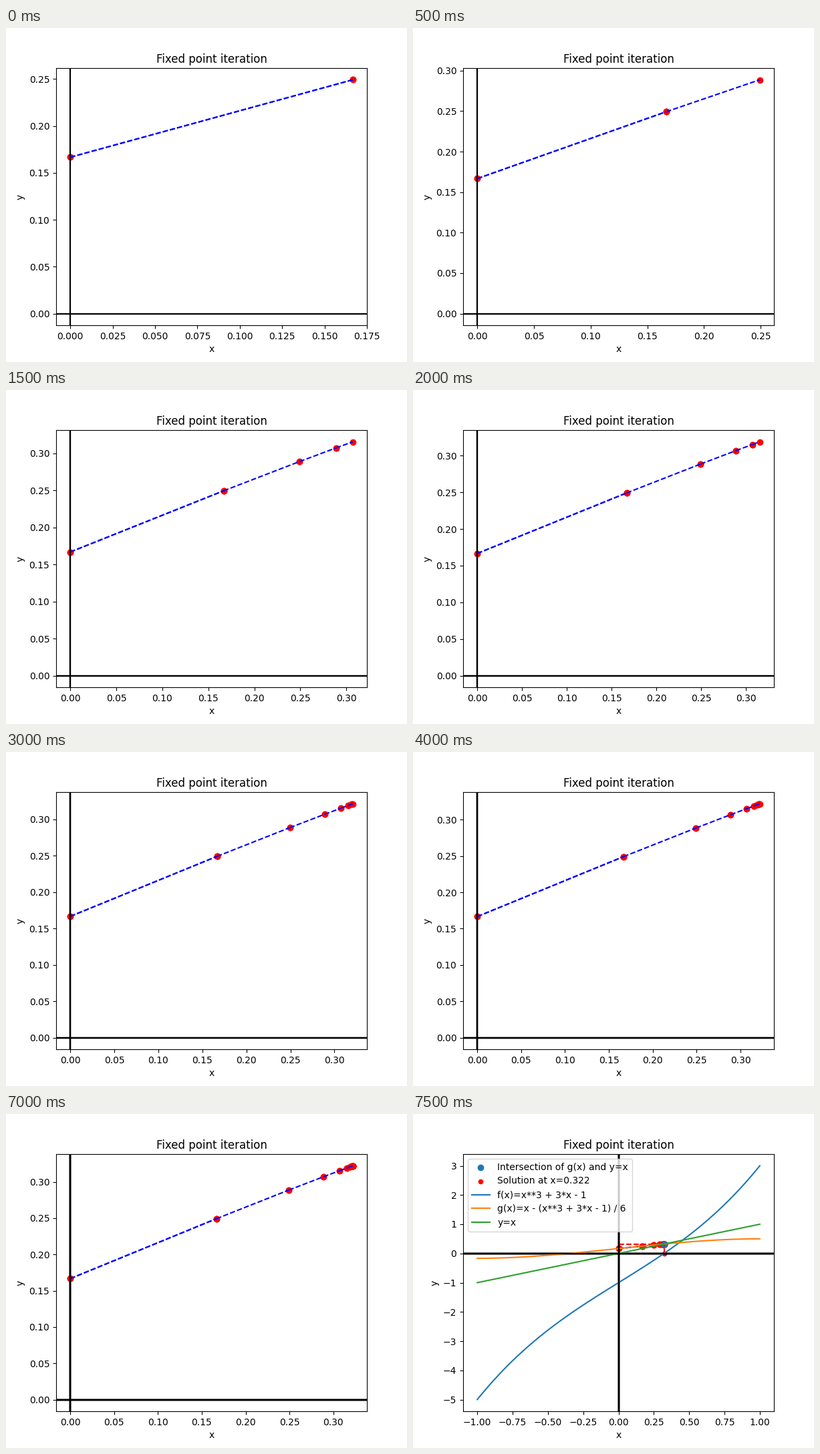
These frames come from a looping animation (600x500 px, 8 s). A matplotlib script:

```python
import numpy as np
import matplotlib.pyplot as plt
from matplotlib.animation import FuncAnimation

FRAMES = 16
INTERVAL = 500


def f(x):
    return x**3 + 3*x - 1


def g(x):
    return x - f(x) / 6


iterates = [0.0]
for _ in range(FRAMES + 1):
    iterates.append(g(iterates[-1]))
root = iterates[-1]

fig = plt.figure(figsize=(6, 5), dpi=100)


def draw_axis_lines(ax):
    ax.axhline(0, color="black")
    ax.axvline(0, color="black")


def draw_step(ax, step):
    x = np.array(iterates[step:step + 2])
    draw_axis_lines(ax)
    ax.scatter(x, g(x), color="red")
    ax.plot(x, g(x), "--", color="blue")


def draw_summary(ax):
    ax.scatter(root, root, color="C0", label="Intersection of g(x) and y=x")
    ax.scatter(root, 0, s=20, color="red", label=f"Solution at x={root:.3f}")
    ax.plot([root, root], [0, root], "--", color="red")
    ax.plot([0, root], [root, root], "--", color="red")
    x = np.linspace(-1, 1, 100)
    ax.plot(x, f(x), color="C0", label="f(x)=x**3 + 3*x - 1")
    ax.plot(x, g(x), color="C1", label="g(x)=x - (x**3 + 3*x - 1) / 6")
    ax.plot(x, x, color="C2", label="y=x")
    draw_axis_lines(ax)
    ax.legend(loc="upper left")


def update(frame):
    # Fresh axes each time, so no data limits carry over between loops.
    fig.clear()
    ax = fig.add_subplot()
    ax.set(title="Fixed point iteration", xlabel="x", ylabel="y")
    # Strokes pile up, so their soft edges darken; the first step counts twice.
    draw_step(ax, 0)
    for step in range(min(frame + 1, FRAMES - 1)):
        draw_step(ax, step)
    if frame == FRAMES - 1:
        draw_summary(ax)
    return []


anim = FuncAnimation(fig, update, frames=FRAMES, interval=INTERVAL,
                     init_func=lambda: update(0), repeat=True, repeat_delay=0)
plt.show()
```
